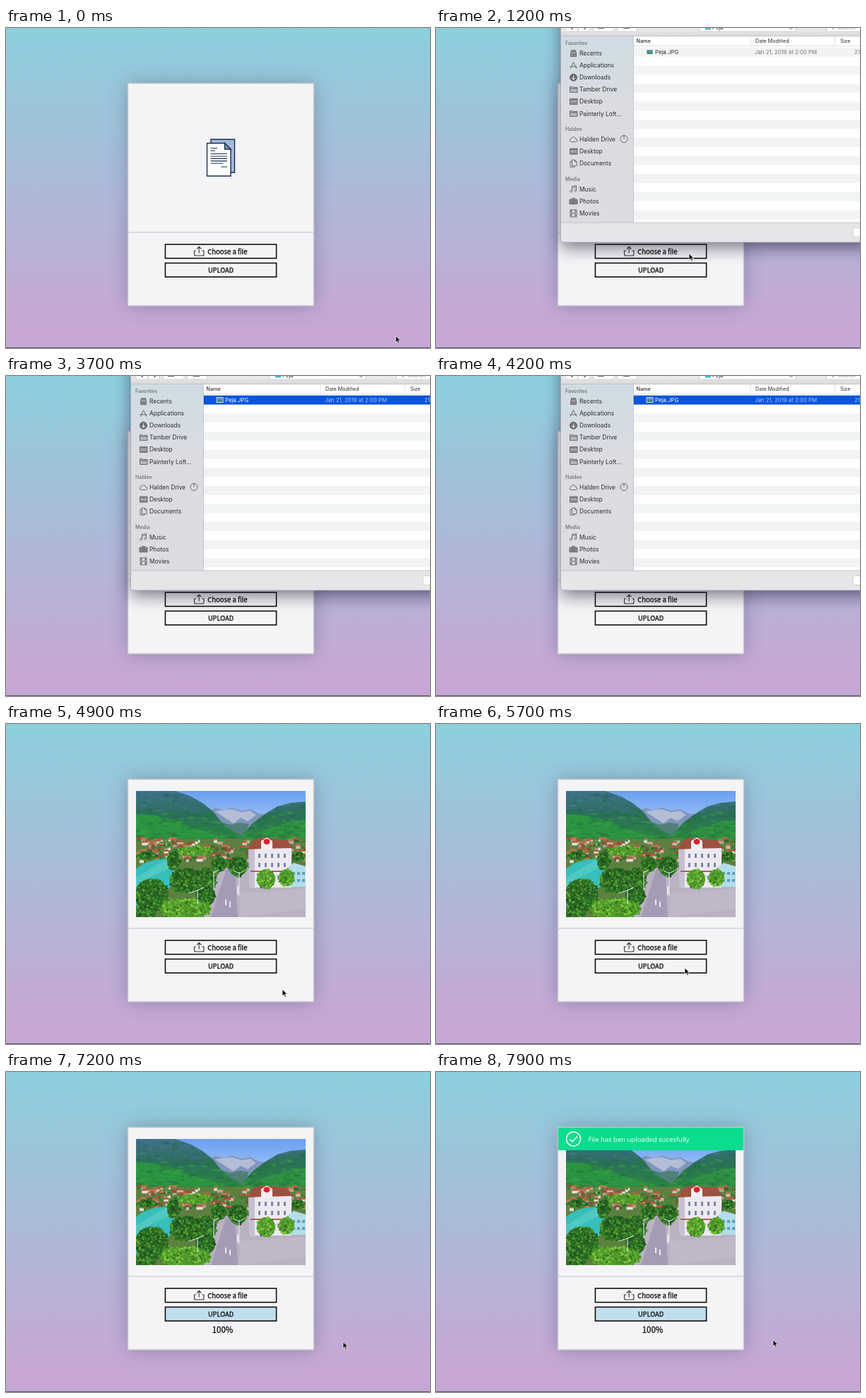
An HTML page that plays this animation: 600 by 454 pixels, repeating every 8000 ms.

```html
<!DOCTYPE html>
<html lang="en">
<head>
<meta charset="utf-8">
<title>File upload</title>
<style>
html, body { margin: 0; width: 100%; height: 100%; overflow: hidden; }
svg { display: block; width: 100vw; height: 100vh; }
text { white-space: pre; }
.ui { font-family: "Noto Sans CJK JP", "Noto Sans CJK SC", "Noto Sans CJK", "Open Sans", sans-serif; font-weight: 500; text-anchor: middle; fill: #0c0c0c; stroke: #0c0c0c; stroke-width: .28; }
.mac { font: 8.4px Inter, sans-serif; fill: #2c2c2e; }
.mac .head { font-size: 7px; font-weight: 600; fill: #77767b; }
.mac .col { font-size: 7.2px; }
.mac .cell { font-size: 7.8px; }
.icon { fill: none; stroke: #69686c; stroke-width: 1; }
</style>
</head>
<body>
<svg viewBox="0 0 600 454">
<defs>
  <linearGradient id="sky" x2="0" y2="1">
    <stop stop-color="#8ccfdd"/><stop offset=".9" stop-color="#c6a8d5"/><stop offset="1" stop-color="#c7a7d5"/>
  </linearGradient>
  <linearGradient id="side" x2="0" y2="1">
    <stop stop-color="#cfdce3"/><stop offset=".22" stop-color="#d5dce3"/><stop offset=".4" stop-color="#dddbe0"/><stop offset="1" stop-color="#dedbe1"/>
  </linearGradient>
  <linearGradient id="bar" x2="0" y2="1"><stop stop-color="#ececee"/><stop offset="1" stop-color="#d9d8da"/></linearGradient>
  <linearGradient id="air" x2="0" y2="1"><stop stop-color="#6a9ff0"/><stop offset=".3" stop-color="#a9c8f8"/></linearGradient>
  <linearGradient id="hill" x2="0" y2="1"><stop stop-color="#41718a"/><stop offset=".45" stop-color="#2b6f5c"/><stop offset="1" stop-color="#2c8a3a"/></linearGradient>
  <filter id="soft" x="-30%" y="-30%" width="160%" height="160%"><feGaussianBlur stdDeviation="11"/></filter>
  <filter id="wide" x="-30%" y="-30%" width="160%" height="160%"><feGaussianBlur stdDeviation="14"/></filter>
  <clipPath id="frame"><rect x="184" y="95" width="240" height="179"/></clipPath>
  <clipPath id="card"><rect x="173" y="60" width="262" height="334"/></clipPath>
  <clipPath id="slopes">
    <path d="M184 95H240L262 103L278 112L292 123L304 138L318 150L336 160V166H184Z"/>
    <path d="M326 166L338 153L350 140L366 128L384 117L402 112L424 110V170Z"/>
  </clipPath>
</defs>

<rect width="600" height="454" fill="url(#sky)"/>
<rect y="453" width="600" height="1" fill="#5d5a63"/>
<rect x="173" y="79" width="262" height="315" fill="#3f4560" opacity=".4" filter="url(#wide)"/>
<rect x="172.5" y="78.5" width="263" height="315.5" fill="#f4f3f6" stroke="#c9c8cb" stroke-width="1.4"/>
<path d="M173 290H435" stroke="#d3d2d6" stroke-width="1.3"/>

<g id="docs" stroke="#16304f" stroke-width="1.4">
  <path d="M290 158H323.5V205H290Z" fill="#a8b9d8"/>
  <path d="M284.500 163.500H309.500L318 172V210H284.500Z" fill="#fff"/>
  <path d="M309.500 163.500V172H318Z" fill="#7f97bf"/>
  <path d="M289.500 170.500H299M289.500 174H296M289.500 178.500H313M289.500 182H313M289.500 185.300H313M289.500 188.600H313M289.500 192H307M304.500 197H313" stroke-width="1.2"/>
</g>

<g id="photo" clip-path="url(#frame)">
  <rect x="184" y="95" width="240" height="179" fill="url(#air)"/>
  <path d="M284 126L296 119L308 122L320 119L333 123L346 121L357 127L366 128L340 162H310Z" fill="#7f95bb"/>
  <path d="M296 124L308 122L320 121L333 125L346 123L354 129L342 138L332 133L322 141L308 132Z" fill="#b3bdd6"/>
  <path d="M300 138L318 143L330 140L344 142L336 160H312Z" fill="#4f7f78"/>
  <g clip-path="url(#slopes)">
    <rect x="184" y="95" width="240" height="75" fill="url(#hill)"/>
    <path d="M184 128Q220 128 250 141T316 162H184Z" fill="#2b9440"/>
    <path d="M340 163Q382 140 424 136V168H340Z" fill="#2f9243"/>
    <g id="forest"></g>
  </g>
  <rect x="184" y="163" width="240" height="111" fill="#5d8040"/>
  <g id="town"></g>
  <path d="M184 206Q198 192 229 191L240 211L232 232L184 258Z" fill="#36bfbb"/>
  <path d="M184 218Q206 204 229 191L234 204Q210 211 184 231Z" fill="#62d0c9" opacity=".6"/>
  <path d="M306 204H345V231H424V274H276L292 226Z" fill="#bab2c3"/>
  <path d="M312 205H324L328 274H290Z" fill="#a39cb4"/>
  <path d="M332 240L424 234V262L330 274Z" fill="#c4bbca" opacity=".7"/>
  <path d="M343 177L352 166H397L404 175V232H345Z" fill="#ece9f1"/>
  <path d="M343 177L345 232L352 234V176Z" fill="#c7bfd2"/>
  <path d="M342 178L350 165L360 161L398 164L405 176L362 177Z" fill="#a0503f"/>
  <path d="M361 178V166L369 161L377 166V178Z" fill="#f2eef3"/>
  <ellipse cx="369" cy="167" rx="4.500" ry="4" fill="#e41e2d"/>
  <path d="M346 209H403" stroke="#b2624e" stroke-width="2"/>
  <path d="M357 187H401M357 200H401M357 218H401" stroke="#7c88a2" stroke-width="6" stroke-dasharray="3 6"/>
  <path d="M395 207L407 197L424 202V231H396Z" fill="#b4dcea"/>
  <path d="M398 212H424M398 222H424" stroke="#5f9fbd" stroke-width="4" stroke-dasharray="4 3"/>
  <g id="trees"></g>
  <path d="M294 209V235M294 211L301 207M330 210V244M322 208L330 212L337 208M271 235V255M259 240L271 236L280 232" fill="none" stroke="#e8eaf4" stroke-width="1"/>
  <path d="M311 249V257M317 252V260M328 230V242" stroke="#eee8ef" stroke-width="2"/>
</g>

<rect id="fill" x="226" y="334" height="19" fill="#bfdfef"/>
<g fill="none" stroke="#111" stroke-width="1.6">
  <rect x="225.400" y="307" width="157.200" height="19.700"/>
  <rect x="225.400" y="333.500" width="157.200" height="19.700"/>
  <path d="M269 316H266.500V321Q266.500 323 268.500 323H278Q280 323 280 321V316H277.500M273.200 319.500V310.500M270 313.500L273.200 310.300L276.400 313.500" stroke="#333" stroke-width="1.100"/>
</g>
<g class="ui">
  <text x="313.400" y="320.800" font-size="9.500">Choose a file</text>
  <text x="304" y="347.300" font-size="9.300">UPLOAD</text>
  <text id="percent" x="306.500" y="369.800" font-size="11.400"></text>
</g>

<g clip-path="url(#card)"><g id="notice">
  <rect x="173" y="79" width="262" height="32" fill="#0bdc8d"/>
  <circle cx="194.500" cy="95" r="10" fill="none" stroke="#fff" stroke-width="1.500"/>
  <path d="M189.500 95.500L193 99L200 91.500" fill="none" stroke="#fff" stroke-width="1.500"/>
  <text x="215.500" y="99" font-size="9.500" fill="#fff" font-family="Open Sans, Noto Sans, sans-serif">File has ben uploaded sucesfully</text>
</g></g>

<g id="dialog" class="mac">
  <rect x="177" y="-30" width="460" height="342" fill="#1b1830" opacity=".55" filter="url(#soft)"/>
  <path d="M176.500 -1H601V304H181Q176.500 304 176.500 299.500Z" fill="#e6e5e8" stroke="#a9a5b0" stroke-width=".8"/>
  <rect x="177" width="423" height="11.500" fill="url(#bar)"/>
  <g fill="#fdfdfd" stroke="#c3c2c5" stroke-width=".7">
    <rect x="184" y="-9" width="16.500" height="14" rx="2"/><rect x="201" y="-9" width="16.500" height="14" rx="2"/>
    <rect x="223" y="-9" width="29" height="14" rx="2"/><rect x="256.500" y="-9" width="28.500" height="14" rx="2"/>
    <rect x="373" y="-9" width="136" height="14" rx="2"/><rect x="552.500" y="-9" width="60" height="14" rx="2"/>
    <rect x="590" y="283.500" width="40" height="13" rx="2.500"/>
  </g>
  <path d="M191 -1L193.500 2M209.500 2L212 -1M229 0H238M265 0H274" stroke="#777" stroke-width="1.800"/>
  <path d="M381 0H389V2.500H381Z" fill="#51b3e5"/>
  <text class="cell" x="391" y="1.700">Peja</text>
  <path d="M500.500 0L502.500 2L504.500 0M561 0L563 2" class="icon"/>
  <text class="cell" x="568" y="1.700" fill="#999">Search</text>
  <rect x="177" y="11.500" width="102.500" height="264.500" fill="url(#side)"/>
  <rect x="279.500" y="11.500" width="321" height="264.500" fill="#fff"/>
  <g id="stripes" fill="#f1f3f4"></g>
  <path d="M177 11.500H600M279.500 11.500V276M177 276.200H600" stroke="#bdbbc0" stroke-width=".8"/>
  <path d="M280 25.500H600M445 12V25M564.500 12V25" stroke="#d8d8da" stroke-width=".8"/>
  <g class="col"><text x="283.500" y="21.200" font-weight="500">Name</text><text x="452" y="21.200">Date Modified</text><text x="572" y="21.200">Size</text></g>
  <rect id="chosen" x="279.800" y="27.600" width="321" height="12.900" fill="#0855dc"/>
  <rect x="298" y="30.500" width="9" height="7" fill="#3f8f5a" stroke="#fff" stroke-width=".8"/>
  <path d="M298.500 31H306.500V33L303 35L298.500 32Z" fill="#5d91c4"/>
  <g class="cell"><text id="file" x="310" y="37">Peja.JPG</text><g id="meta"><text x="451" y="37">Jan 21, 2019 at 2:00 PM</text><text x="592" y="37">217 KB</text></g></g>
  <g id="places"></g>
  <circle cx="266" cy="157.500" r="5" class="icon"/><path d="M266 152.500V157.500" class="icon"/>
</g>

<path id="cursor" d="M0 0V9.300L2.200 7.300L3.800 10.800L5.400 10.100L3.900 6.700H6.800Z" fill="#0b0b0b" stroke="#fff" stroke-width=".7"/>
</svg>

<script>
const $ = id => document.getElementById(id);
const make = (parent, tag, attrs, text = '') => {
  const el = document.createElementNS('http://www.w3.org/2000/svg', tag);
  for (const k in attrs) el.setAttribute(k, attrs[k]);
  el.textContent = text;
  return parent.appendChild(el);
};
const show = (id, on) => $(id).style.display = on ? '' : 'none';

let seed = 7;
const rnd = (a, b) => a + (b - a) * ((seed = seed * 16807 % 2147483647) / 2147483647);
const pick = list => list[Math.floor(rnd(0, list.length))];

// Sidebar icons, drawn around their own centre
const icons = {
  clock: 'M-4 1L-3 -4.500H3L4 1V4.500H-4ZM-4 1H4M-3 2.800H3M-3 -2.500H3',
  apps: 'M-4.500 4.500L0 -4.500L4.500 4.500M-5 1.800H5',
  down: 'M0 -5A5 5 0 1 1 0 5A5 5 0 1 1 0 -5M0 -3V3M-2.500 .5L0 3L2.500 .5',
  folder: 'M-5 -4H-1.500L-.5 -3H5.500V4H-5ZM-5 -1.500H5.500',
  desk: 'M-5 -4H5.500V4H-5ZM-5 -2.500H5.500M-4 2.500H4.500',
  cloud: 'M-3 3.500Q-6 3 -5 .5Q-4.500 -1 -3 -1Q-2 -4.500 1.500 -3Q3 -2 3 -.5Q6 0 5.500 2Q5 3.500 3 3.500Z',
  pages: 'M-2 -5H2L4.500 -2.500V3.500H-2ZM-2 -3H-4.500V5H1.500V3.500M2 -5V-2.500H4.500',
  note: 'M-2 3V-4L4 -5V2M-2 -2L4 -3M-2 3A1.500 1.300 0 1 1 -2 2.900M4 2A1.500 1.300 0 1 1 4 1.900',
  camera: 'M-5.500 -2.500H-3L-2 -4H2L3 -2.500H5.500V4H-5.500ZM0 -1.500A2 2 0 1 1 0 2.700A2 2 0 1 1 0 -1.500',
  film: 'M-4.500 -5H4.500V5H-4.500ZM-2.500 -5V5M2.500 -5V5M-2.500 0H2.500M-4.500 -2.500H-2.500M-4.500 2.500H-2.500M2.500 -2.500H4.500M2.500 2.500H4.500'
};
const filled = { down: '#6a696d', camera: '#858489', folder: '#b7b6bb', desk: '#a5a4a9', clock: '#a5a4a9' };
const sections = [
  [21, 'Favorites', 36, [['clock', 'Recents'], ['apps', 'Applications'], ['down', 'Downloads'], ['folder', 'Tamber Drive'], ['desk', 'Desktop'], ['folder', 'Painterly Loft...']]],
  [143, 'Halden', 158, [['cloud', 'Halden Drive'], ['desk', 'Desktop'], ['pages', 'Documents']]],
  [214, 'Media', 228.7, [['note', 'Music'], ['camera', 'Photos'], ['film', 'Movies']]]
];
for (const [headY, title, top, items] of sections) {
  make($('places'), 'text', { x: 183, y: headY + 2.6, class: 'head' }, title);
  items.forEach(([icon, label], i) => {
    const y = top + i * 17.1;
    make($('places'), 'path', { d: icons[icon], class: 'icon', transform: `translate(194.500 ${y})`, style: `fill:${filled[icon] || 'none'}` });
    if (icon === 'down') make($('places'), 'path', { d: 'M0 -3V3M-2.500 .5L0 3L2.500 .5', fill: 'none', stroke: '#eee', transform: `translate(194.500 ${y})` });
    make($('places'), 'text', { x: 203, y: y + 3 }, label);
  });
}
for (let y = 27.6; y < 270; y += 25.65) make($('stripes'), 'rect', { x: 280, y, width: 320, height: 12.8 });

// Wooded slopes, town roofs and leafy crowns of the picture
for (let i = 0; i < 260; i++) {
  const y = rnd(98, 164);
  make($('forest'), 'ellipse', { cx: rnd(184, 424), cy: y, rx: rnd(2, 7), ry: rnd(1, 2.5), opacity: 0.45,
    fill: pick(y < 125 ? ['#34617a', '#50808f', '#28624f'] : ['#1f6b42', '#3ea046', '#237a3a']) });
}
for (let i = 0; i < 190; i++) {
  const y = 163 + i * 0.16, x = rnd(184, 424), w = rnd(4, 10);
  make($('town'), 'rect', { x, y, width: w, height: 4, fill: pick(['#cdbcae', '#b9a292', '#e6ddd8', '#3f7a38', '#2f6a30']) });
  make($('town'), 'path', { d: `M${x - 1} ${y}l2 -3h${w - 2}l2 3z`, fill: pick(['#a9623f', '#b9764f', '#8f5138', '#4f8a3c']) });
}
function tree(x, y, rx, ry, shades) {
  make($('trees'), 'ellipse', { cx: x, cy: y, rx, ry, fill: shades[0] });
  for (let i = 0; i < rx * ry * 0.5; i++) {
    const a = rnd(0, 6.283), d = Math.sqrt(rnd(0, 1.1));
    make($('trees'), 'circle', { cx: x + Math.cos(a) * d * rx, cy: y + Math.sin(a) * d * ry, r: rnd(0.7, 2), fill: pick(shades) });
  }
}
const dark = ['#2a6a24', '#1d4f1e', '#3f8a2c', '#5aa136'], fresh = ['#4f9a2a', '#35761f', '#6cb435', '#83c545'];
[[200, 187, 15, 5, dark], [268, 180, 24, 7, fresh], [237, 194, 9, 13, dark], [301, 199, 11, 11, dark], [328, 202, 13, 14, dark],
 [254, 222, 22, 18, dark], [282, 222, 15, 18, dark], [206, 243, 24, 23, dark], [282, 243, 14, 16, dark], [253, 262, 36, 15, fresh], [195, 267, 18, 10, dark],
 [368, 220, 13, 14, fresh], [397, 218, 11, 12, fresh], [414, 188, 9, 7, dark]]
  .forEach(args => tree(...args));

const path = [
  [0, 551.5, 437], [100, 551.5, 437], [800, 358, 320], [1300, 358, 320], [2300, 318, 37], [2800, 318, 37],
  [3500, 640, 288], [4300, 640, 400], [4500, 559, 413], [4900, 391, 376.5], [5400, 352, 346], [5800, 352, 346],
  [6400, 411, 359], [7100, 477, 383], [7900, 477, 380], [8000, 477, 380]
];
const ease = p => p * p * (3 - 2 * p);
const ramp = (t, a, b) => Math.min(1, Math.max(0, (t - a) / (b - a)));
function pointer(t) {
  const i = path.findIndex(k => k[0] > t), [t0, x0, y0] = path[i - 1], [t1, x1, y1] = path[i];
  const p = ease(ramp(t, t0, t1));
  return [x0 + (x1 - x0) * p, y0 + (y1 - y0) * p];
}

function draw(now) {
  const t = now % 8000;
  const open = t >= 1000 && t < 4400, selected = t >= 2500, loaded = t >= 4400;
  show('dialog', open);
  show('chosen', selected);
  $('file').style.fill = selected ? '#fff' : '#2c2c2e';
  $('meta').style.fill = selected ? '#a9c8fa' : '#77767a';
  show('docs', !loaded);
  show('photo', loaded);

  const done = Math.round(100 * (t < 6400 ? 0.44 * ramp(t, 5800, 6400) : 0.44 + 0.56 * ramp(t, 6400, 7200)));
  $('fill').setAttribute('width', 156 * done / 100);
  $('percent').textContent = t >= 5800 ? done + '%' : '';

  const p = ramp(t, 7300, 7600);
  $('notice').setAttribute('opacity', p);
  $('notice').setAttribute('transform', `translate(0 ${-11 * (1 - ease(p))})`);
  $('cursor').setAttribute('transform', `translate(${pointer(t)})`);
}
const start = performance.now();
(function tick() {
  draw(Math.max(0, performance.now() - start));
  requestAnimationFrame(tick);
})();
</script>
</body>
</html>
```
